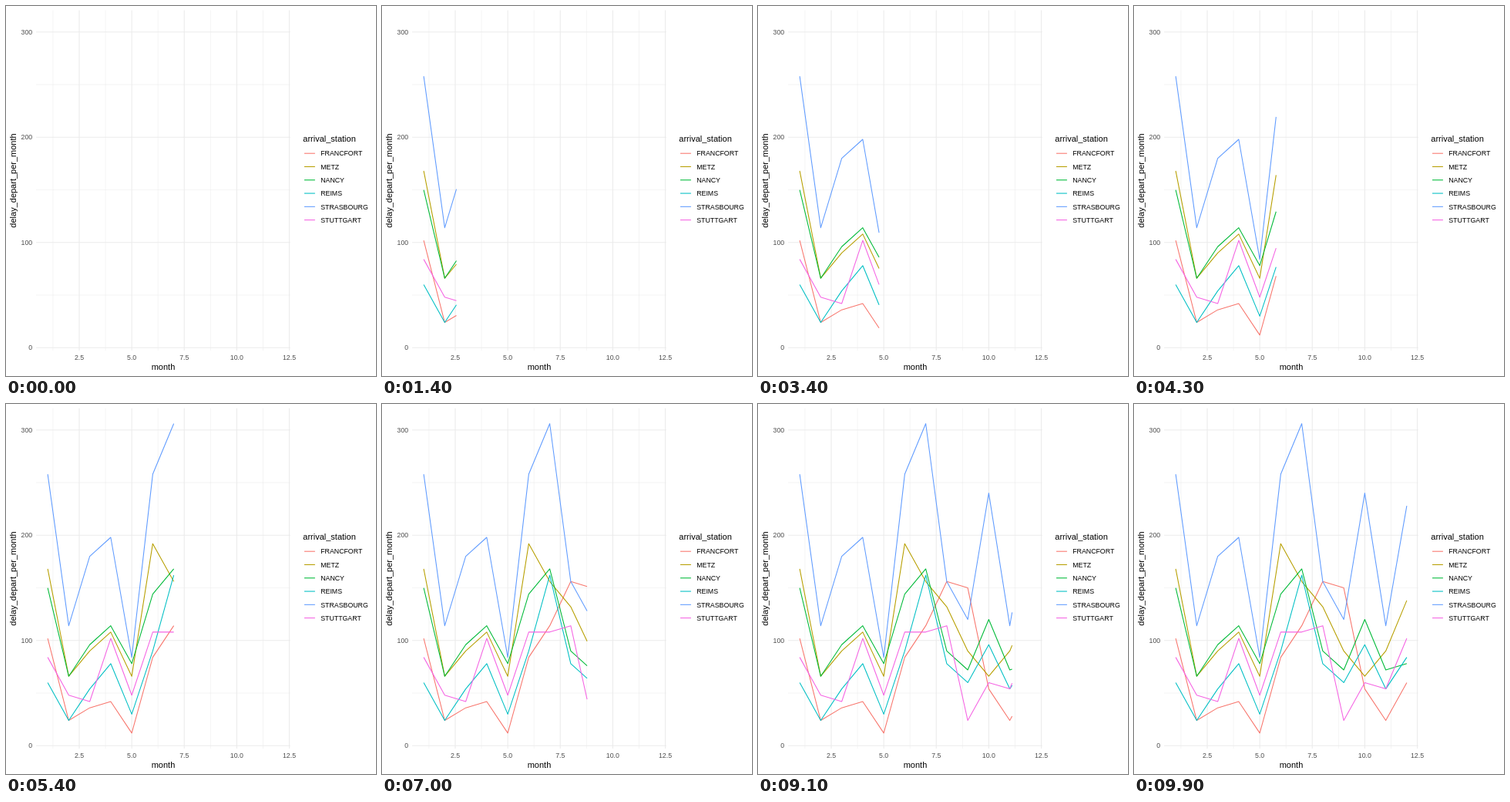
These frames come from a looping animation (480 by 480 pixels, 10 s). An HTML page:

```html
<!DOCTYPE html>
<html lang="en">
<head>
<meta charset="utf-8">
<title>Delay per month</title>
<style>
  html, body { margin: 0; width: 100%; height: 100%; overflow: hidden; background: #fff; }
  svg { display: block; width: 480px; height: 480px; }
  text { font: 11px "Liberation Sans", Arial, sans-serif; fill: #000; }
  .tick, .key { font-size: 8.8px; }
  .tick { fill: #4d4d4d; }
  .mid { text-anchor: middle; }
  .end { text-anchor: end; }
  path { fill: none; stroke-width: 1.07; stroke-linejoin: round; }
  .major, .minor { stroke: #ebebeb; }
  .minor { stroke-width: .53; }
</style>
</head>
<body>
<svg id="chart" viewBox="0 0 480 480"></svg>
<script>
const LOOP = 10000, STEP = 100, LAST = LOOP / STEP - 1;
const LEFT = 39.1, RIGHT = 368.9, TOP = 5.5, BOTTOM = 447;
const UNIT = 6; // every delay is a multiple of this

// Name, colour and one key point per month, in units
const series = [
  ["FRANCFORT", "#F8766D", [17, 4, 6, 7, 2, 14, 19, 26, 25, 9, 4, 10]],
  ["METZ", "#B79F00", [28, 11, 15, 18, 11, 32, 26, 22, 15, 11, 15, 23]],
  ["NANCY", "#00BA38", [25, 11, 16, 19, 13, 24, 28, 15, 12, 20, 12, 13]],
  ["REIMS", "#00BFC4", [10, 4, 9, 13, 5, 15, 27, 13, 10, 16, 9, 14]],
  ["STRASBOURG", "#619CFF", [43, 19, 30, 33, 14, 43, 51, 26, 20, 40, 19, 38]],
  ["STUTTGART", "#F564E3", [14, 8, 7, 17, 8, 18, 18, 19, 4, 10, 9, 17]]
];

const chart = document.getElementById("chart");
const px = month => 95 + (month - 2.5) * 27.25;
const py = value => 443.3 - value * 1.3652;

function add(tag, attrs, text = "") {
  const node = document.createElementNS("http://www.w3.org/2000/svg", tag);
  for (const name in attrs) node.setAttribute(name, attrs[name]);
  node.textContent = text;
  chart.append(node);
  return node;
}
// Whole-pixel baselines keep small text crisp
const label = (x, y, text, cls = "") => add("text", { x, y: Math.round(y), class: cls }, text);
const vertical = (month, cls) => add("path", { d: `M${px(month)} ${TOP}V${BOTTOM}`, class: cls });
const horizontal = (value, cls) => add("path", { d: `M${LEFT} ${py(value)}H${RIGHT}`, class: cls });

// Grid and axes
for (let v = 50; v < 300; v += 100) horizontal(v, "minor");
for (let m = 1.25; m < 12; m += 2.5) vertical(m, "minor");
for (let v = 0; v <= 300; v += 100) {
  horizontal(v, "major");
  label(34.2, py(v) + 3.1, v, "tick end");
}
for (let m = 2.5; m <= 12.5; m += 2.5) {
  vertical(m, "major");
  label(px(m), 459, m.toFixed(1), "tick mid");
}
label(204, 472, "month", "mid");
add("text", { transform: "translate(13 226.5) rotate(-90)", class: "mid" }, "delay_depart_per_month");

// Legend and data lines
label(385.3, 176, "arrival_station");
const lines = series.map(([name, stroke, units], i) => {
  const y = 191.2 + i * 17.28;
  add("path", { d: `M387 ${y}H400.9`, stroke });
  label(408.2, y + 3.2, name, "key");
  return { units, path: add("path", { stroke }) };
});

function trace(units, month) {
  const whole = Math.floor(month), part = month - whole;
  const points = units.slice(0, whole).map((n, i) => [px(i + 1), py(n * UNIT)]);
  if (part > 1e-6) {
    const from = units[whole - 1], to = units[whole];
    points.push([px(month), py((from + (to - from) * part) * UNIT)]);
  }
  return points.length > 1 ? "M" + points.join("L") : "";
}

function draw(now) {
  const step = Math.floor((now % LOOP) / STEP);
  const month = 1 + 11 * step / LAST;
  for (const { units, path } of lines) path.setAttribute("d", trace(units, month));
  requestAnimationFrame(draw);
}
draw(0);
</script>
</body>
</html>
```
